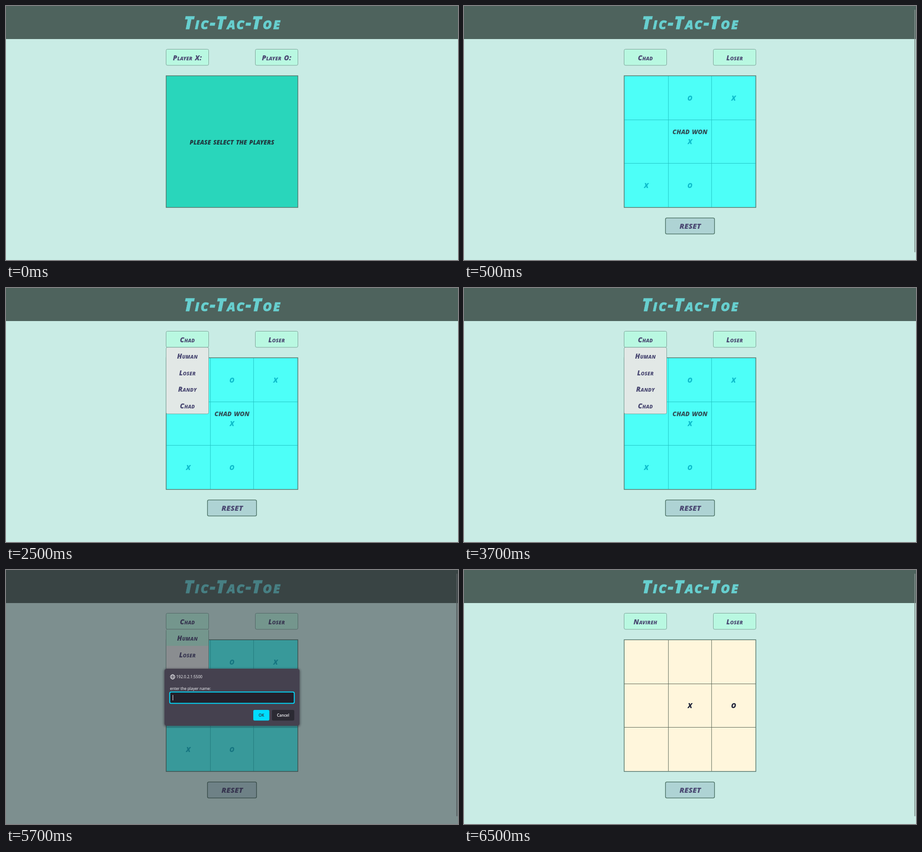
Animation, 998 px wide and 561 px high, one loop 8 s. Source, as an HTML page:

```html
<!DOCTYPE html>
<html lang="en">
<head>
<meta charset="utf-8">
<title>Tic-Tac-Toe</title>
<style>
  html, body { margin: 0; width: 100%; height: 100%; overflow: hidden; background: #c9ece5; }
  svg { display: block; width: 100%; height: 100%; }
  text { font: italic 800 15.2px "Open Sans", "Noto Sans", sans-serif; text-anchor: middle; fill: #4b4a73; word-spacing: 1.5px; }
  .caps { font-variant: small-caps; letter-spacing: .2px; }
  .title { font-size: 38.5px; letter-spacing: 3px; fill: #67cfcf; stroke: #67cfcf; stroke-width: .8; }
  .button { fill: #b9f8e1; stroke: #7a9f96; }
  .menu { fill: #e2e8e6; stroke: #7a9f96; }
  .reset { fill: #aed3d4; stroke: #4e7568; stroke-width: 1.5; }
  .board { stroke: #55766c; stroke-width: 1.5; }
  .dialog text { font: 400 8.5px "Open Sans", "Noto Sans", sans-serif; fill: #fbfbfe; text-anchor: start; word-spacing: 0; }
  .dialog .mid { text-anchor: middle; font-weight: 600; }
</style>
</head>
<body>
<svg viewBox="0 0 998 561" preserveAspectRatio="none">
  <defs>
    <filter id="soft" x="-10%" y="-10%" width="120%" height="125%"><feGaussianBlur stdDeviation="2"/></filter>
  </defs>
  <rect width="998" height="561" fill="#c9ece5"/>
  <rect width="998" height="73" fill="#4e635d"/>
  <text class="caps title" x="500.5" y="50.5">Tic-Tac-Toe</text>
  <g id="game"></g>
  <path id="scrollbar" d="M995.5 9V543" stroke="#818e8b" stroke-width="2" stroke-linecap="round"/>
  <g id="prompt" class="dialog">
    <rect width="998" height="561" fill="#211e26" opacity=".45"/>
    <rect x="348" y="218" width="302" height="128" rx="6" fill="#211e26" opacity=".45" filter="url(#soft)"/>
    <rect x="350" y="218" width="298" height="126" rx="5" fill="#45414f"/>
    <g fill="none" stroke="#fbfbfe">
      <circle cx="368" cy="236" r="5"/>
      <ellipse cx="368" cy="236" rx="2.3" ry="5" stroke-width=".8"/>
      <path d="M363.5 234h9M363.5 238h9" stroke-width=".8"/>
    </g>
    <text x="376" y="239">192.0.2.1:5500</text>
    <text x="362" y="264.5">enter the player name:</text>
    <rect x="361.5" y="269.5" width="275" height="25" rx="3" fill="#23202b" stroke="#00ddff" stroke-width="2"/>
    <path d="M368.5 276v12" stroke="#fbfbfe"/>
    <rect x="546" y="309" width="35.5" height="23.5" rx="3" fill="#00ddff"/>
    <rect x="587" y="309" width="49.5" height="23.5" rx="3" fill="#2b2a33"/>
    <text class="mid" x="563.8" y="324" style="fill:#2b2a33">OK</text>
    <text class="mid" x="611.8" y="324">Cancel</text>
  </g>
</svg>
<script>
const LOOP = 8000;
const won = { fill: "#4dfff8", line: "#22c3c4", ink: "#0fbccb", marks: "-OX-X-XO-",
              note: "CHAD WON", noteY: 283, noteSize: 14, noteInk: "#2f5058" };
const scenes = [
  { at: 0, players: ["Player X:", "Player O:"], fill: "#29d6bb",
    note: "PLEASE SELECT THE PLAYERS", noteY: 305.5, noteSize: 13.4, noteInk: "#1f3a40" },
  { at: 500, players: ["Chad", "Loser"], ...won, bar: true },
  { at: 2500, players: ["Chad", "Loser"], ...won, menu: true },
  { at: 4500, players: ["Chad", "Loser"], ...won, menu: true, hover: true, prompt: true, bar: true },
  { at: 6500, players: ["Navireh", "Loser"], fill: "#fff6dc", line: "#566454", ink: "#20243a",
    marks: "----XO---", bar: true }
];

const byId = id => document.getElementById(id);
const box = (cls, x, y, w, h, rx = 3, style = "") =>
  `<rect class="${cls}" x="${x}" y="${y}" width="${w}" height="${h}" rx="${rx}" style="${style}"/>`;
const label = (str, x, y, style = "", cls = "") =>
  `<text class="${cls}" x="${x}" y="${y}" style="${style}">${str}</text>`;

function drawBoard(s) {
  let out = box("board", 353.6, 154.1, 290.8, 290.8, 0, `fill:${s.fill}`);
  if (s.marks) {
    out += `<path d="M451.3 155V444M546.7 155V444M354 251.5H644M354 347.5H644" stroke="${s.line}"/>`;
    [...s.marks].forEach((mark, i) => {
      if (mark !== "-")
        out += label(mark, 402.5 + i % 3 * 96.4, 208.8 + Math.floor(i / 3) * 96.4, `font-size:15px;fill:${s.ink}`);
    });
    out += box("reset", 444.8, 468.2, 108.4, 35.2) + label("RESET", 499.5, 492, "font-size:16.5px");
  }
  if (s.note) out += label(s.note, 499, s.noteY, `font-size:${s.noteSize}px;fill:${s.noteInk}`);
  return out;
}

function drawMenu(s) {
  let out = box("menu", 353.5, 131, 94, 147);
  if (s.hover) out += box("", 354, 131.5, 93, 36, 0, "fill:#b9f8e1");
  ["Human", "Loser", "Randy", "Chad"].forEach((name, i) => {
    out += label(name, 400.5, 156 + i * 36.5, "", "caps");
  });
  return out;
}

function draw(s) {
  let out = drawBoard(s);
  s.players.forEach((name, i) => {
    const x = 353.5 + i * 197;
    out += box("button", x, 95.5, 94, 35.5) + label(name, x + 47, 120, "", "caps");
  });
  if (s.menu) out += drawMenu(s);
  byId("game").innerHTML = out;
  byId("scrollbar").style.display = s.bar ? "" : "none";
  byId("prompt").style.display = s.prompt ? "" : "none";
}

const start = performance.now();
let current;
function tick() {
  const t = (performance.now() - start) % LOOP;
  const scene = scenes.findLast(s => s.at <= t);
  if (scene !== current) draw(current = scene);
  requestAnimationFrame(tick);
}
tick();
</script>
</body>
</html>
```
